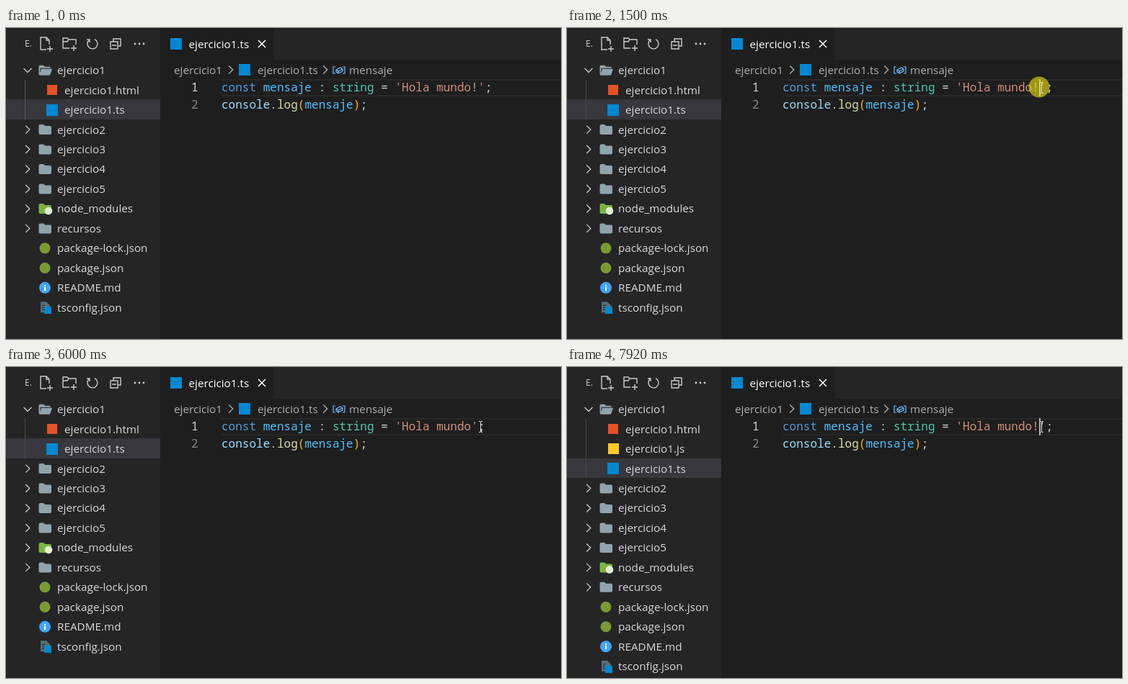
These frames come from a looping animation (770x432 px, 8000 ms). An HTML page with a canvas:

```html
<!DOCTYPE html>
<html lang="es">
<head>
<meta charset="utf-8">
<title>Editor</title>
<style>
html, body { margin: 0; width: 100%; height: 100%; overflow: hidden; background: #1e1e1e; }
canvas { display: block; }
</style>
</head>
<body>
<canvas id="stage" width="770" height="432"></canvas>
<script>
const ctx = document.getElementById('stage').getContext('2d');
const LOOP = 8000;
const UI = '15.25px "Open Sans", "Noto Sans", sans-serif';
const MONO = '16.03px "Noto Sans Mono", monospace';
const CODE_X = 299, CHAR_W = 9.62;
const BLUE = '#0288d1', GRAY = '#90a4ae', GREEN = '#7a9a35';

function rect(x, y, w, h, color) {
  ctx.fillStyle = color;
  ctx.fillRect(x, y, w, h);
}

function disc(x, y, r, color) {
  ctx.fillStyle = color;
  ctx.beginPath();
  ctx.arc(x, y, r, 0, Math.PI * 2);
  ctx.fill();
}

function text(str, x, y, color, font = UI) {
  ctx.font = font;
  ctx.fillStyle = color;
  ctx.fillText(str, x, y);
}

function stroke(path, color, x = 0, y = 0, width = 1.4) {
  ctx.save();
  ctx.translate(x, y);
  ctx.strokeStyle = color;
  ctx.lineWidth = width;
  ctx.stroke(new Path2D(path));
  ctx.restore();
}

function fill(path, color, x, y) {
  ctx.save();
  ctx.translate(x, y);
  ctx.fillStyle = color;
  ctx.fill(new Path2D(path));
  ctx.restore();
}

function square(x, y, size, color) {
  rect(Math.round(x - size / 2), Math.round(y - size / 2), size, size, color);
}

const FOLDER = 'M-6.5 -7H-2L0 -5H7Q9 -5 9 -3V5Q9 7 7 7H-6.5Q-8.5 7 -8.5 5V-5Q-8.5 -7 -6.5 -7Z';

const icons = {
  folder: (x, y) => fill(FOLDER, GRAY, x, y),
  open(x, y) {
    fill('M-6.5 -7H-2L0 -5H6Q8 -5 8 -3H-6.5V4L-5 -2H10L7.5 5.5Q7 7 5.5 7H-6.5Q-8.5 7 -8.5 5V-5Q-8.5 -7 -6.5 -7Z', GRAY, x, y);
  },
  modules(x, y) {
    fill(FOLDER, '#7cb342', x, y);
    disc(x + 5, y + 3, 5.3, '#e3efd3');
  },
  html: (x, y) => square(x, y, 14, '#e65225'),
  js: (x, y) => square(x, y, 15, '#ffca28'),
  ts: (x, y) => square(x, y, 16, BLUE),
  json: (x, y) => disc(x, y, 7.5, GREEN),
  info(x, y) {
    disc(x, y, 8, '#42a5f5');
    rect(x - 1, Math.round(y) - 4, 2, 2, '#fff');
    rect(x - 1, Math.round(y) - 1, 2, 5, '#fff');
  },
  config(x, y) {
    fill('M-6 -8H2L7 -3V7H-6Z', '#546e7a', x, y);
    stroke('M-4 -3H0M-4 0H0M-4 3H0', '#252526', x, y, 1);
    rect(x - 1, Math.round(y) - 1, 10, 10, BLUE);
  }
};

// icon, label, depth
const jsRow = ['js', 'ejercicio1.js', 1];
const files = [
  ['open', 'ejercicio1', 0],
  ['html', 'ejercicio1.html', 1],
  ['ts', 'ejercicio1.ts', 1],
  ...[2, 3, 4, 5].map(n => ['folder', 'ejercicio' + n, 0]),
  ['modules', 'node_modules', 0],
  ['folder', 'recursos', 0],
  ['json', 'package-lock.json', 0],
  ['json', 'package.json', 0],
  ['info', 'README.md', 0],
  ['config', 'tsconfig.json', 0]
];

function chevron(x, y, color, open) {
  stroke(open ? 'M-5.5 -2.7L0 2.8L5.5 -2.7' : 'M-2.8 -5.5L2.8 0L-2.8 5.5', color, x, y, 1.3);
}

function drawTree(t) {
  const rowH = 27.46, top = 45;
  const compiled = t >= 7080;
  const rows = compiled ? [...files.slice(0, 2), jsRow, ...files.slice(2)] : files;
  const selected = compiled ? 3 : 2;
  const selTop = Math.floor(top + selected * rowH);
  const selEnd = Math.floor(top + (selected + 1) * rowH);
  rect(0, selTop, 214, selEnd - selTop, '#37373d');
  rect(26, 72, 1, selEnd - 72, t < 1340 ? '#585858' : '#4b4b4b');
  rows.forEach(([icon, label, depth], i) => {
    const y = top + (i + 0.5) * rowH;
    if (['open', 'folder', 'modules'].includes(icon)) chevron(30, y, '#cccccc', icon === 'open');
    icons[icon](depth ? 64 : 54, y);
    text(label, depth ? 81 : 71, Math.round(y + 5.4), '#dadada');
  });
}

function drawToolbar() {
  const c = '#cccccc';
  text('E.', 26, 26, '#d0d0d0', '12px "Open Sans", sans-serif');
  stroke('M1 8H-7V-9H1L5 -5V1M1 -9V-5H5M6 3V11M2 7H10', c, 55, 22);
  stroke('M0 6H-9V-8H-3L-1 -6H9V1M-9 -3H-3L-1 -6M6 2V10M2 6H10', c, 88, 22);
  stroke('M-4.5 -5.5A7 7 0 1 0 3 -6.4M-8 -6H-4V-2', c, 120, 22);
  stroke('M-3 -3V-7H7V3H3M-7 -3H3V7H-7ZM-5 2H1', c, 152, 22);
  for (const dx of [-6, 0, 6]) disc(185 + dx, 22, 1.4, c);
}

function drawHeader() {
  rect(372, 0, 398, 44, '#252526');
  icons.ts(236, 22);
  text('ejercicio1.ts', 253.5, 28, '#ffffff');
  stroke('M-5 -5L5 5M5 -5L-5 5', '#ffffff', 355, 22, 1.5);

  const gray = '#b0b0b0';
  text('ejercicio1', 233, 64, gray);
  chevron(312, 58, gray);
  icons.ts(331, 58);
  text('ejercicio1.ts', 349, 64, gray);
  chevron(443, 58, gray);
  stroke('M-5 -4H-8V5H-5M5 -4H8V5H5M-4 0L2 -3L5 -1V2L-1 5L-4 3ZM-4 0L-1 2L5 -1M-1 2V5', '#75beff', 462, 58, 1.2);
  text('mensaje', 476, 64, gray);
}

function codeLine(parts, y) {
  let col = 0;
  for (const [str, color] of parts) {
    text(str, CODE_X + col * CHAR_W, y, color, MONO);
    col += str.length;
  }
}

const hasBang = t => t < 1880 || (t >= 2510 && t < 5520) || t >= 7920;

function drawCode(t) {
  const plain = '#d4d4d4', name = '#4fc1ff', paren = '#f5b82e';
  for (const y of [71, 93]) rect(CODE_X, y, 770 - CODE_X, 2, '#282828');
  text('1', 257, 88, '#d6d6d6', MONO);
  text('2', 257, 112, '#858585', MONO);
  codeLine([
    ['const', '#569cd6'], [' mensaje', name], [' : ', plain], ['string', '#4ec9b0'], [' = ', plain],
    [hasBang(t) ? "'Hola mundo!'" : "'Hola mundo'", '#ce9178'], [';', plain]
  ], 88);
  codeLine([
    ['console', '#9cdcfe'], ['.', plain], ['log', '#dcdcaa'], ['(', paren],
    ['mensaje', name], [')', paren], [';', plain]
  ], 112);
}

// Each click or keystroke shows the caret, later entries toggle it.
const blinks = [1340, 2360, 2510, 3000, 3450, 3950, 4440, 4920, 5420, 6000, 6490, 6970, 7450];

function drawCaret(t) {
  if (blinks.filter(b => t >= b).length % 2) rect(hasBang(t) ? 655 : 645, 71, 2, 24, '#aeafad');
}

// time, x, y
const track = [
  [280, 715, 407], [430, 688, 250], [590, 665, 130],
  [760, 653, 93], [1000, 657, 84], [1100, 658, 83]
];

function pointerAt(t) {
  const last = track.length - 1;
  if (t >= track[last][0]) return track[last].slice(1);
  const i = track.findIndex(k => k[0] > t) - 1;
  const a = track[i], b = track[i + 1];
  const span = b[0] - a[0], u = (t - a[0]) / span;
  const slope = (k, axis) => {
    if (k >= last - 1) return 0;
    const from = track[Math.max(k - 1, 0)], to = track[k + 1];
    return (to[axis] - from[axis]) / (to[0] - from[0]);
  };
  return [1, 2].map(axis =>
    a[axis] * (1 + 2 * u) * (1 - u) ** 2 + b[axis] * u * u * (3 - 2 * u) +
    span * (slope(i, axis) * u * (1 - u) ** 2 + slope(i + 1, axis) * u * u * (u - 1)));
}

function drawPointer(t) {
  if (t < 280) return;
  const [x, y] = pointerAt(t).map(Math.round);
  if (t >= 1280 && t < 1620) {
    ctx.globalAlpha = 0.7 * Math.min(1, (1620 - t) / 140);
    disc(655, 82, 14.5, '#f0e614');
    ctx.globalAlpha = 1;
  }
  const c = '#e0e0e0';
  for (const edge of [y - 8, y + 7]) {
    rect(x - 2, edge, 2, 1, c);
    rect(x + 1, edge, 2, 1, c);
  }
  rect(x, y - 7, 1, 14, c);
}

function draw(t) {
  rect(0, 0, 770, 432, '#1e1e1e');
  rect(0, 0, 214, 432, '#252526');
  drawToolbar();
  drawTree(t);
  drawHeader();
  drawCode(t);
  drawCaret(t);
  drawPointer(t);
}

const start = performance.now();
function frame() {
  draw((performance.now() - start) % LOOP);
  requestAnimationFrame(frame);
}
frame();
</script>
</body>
</html>
```
